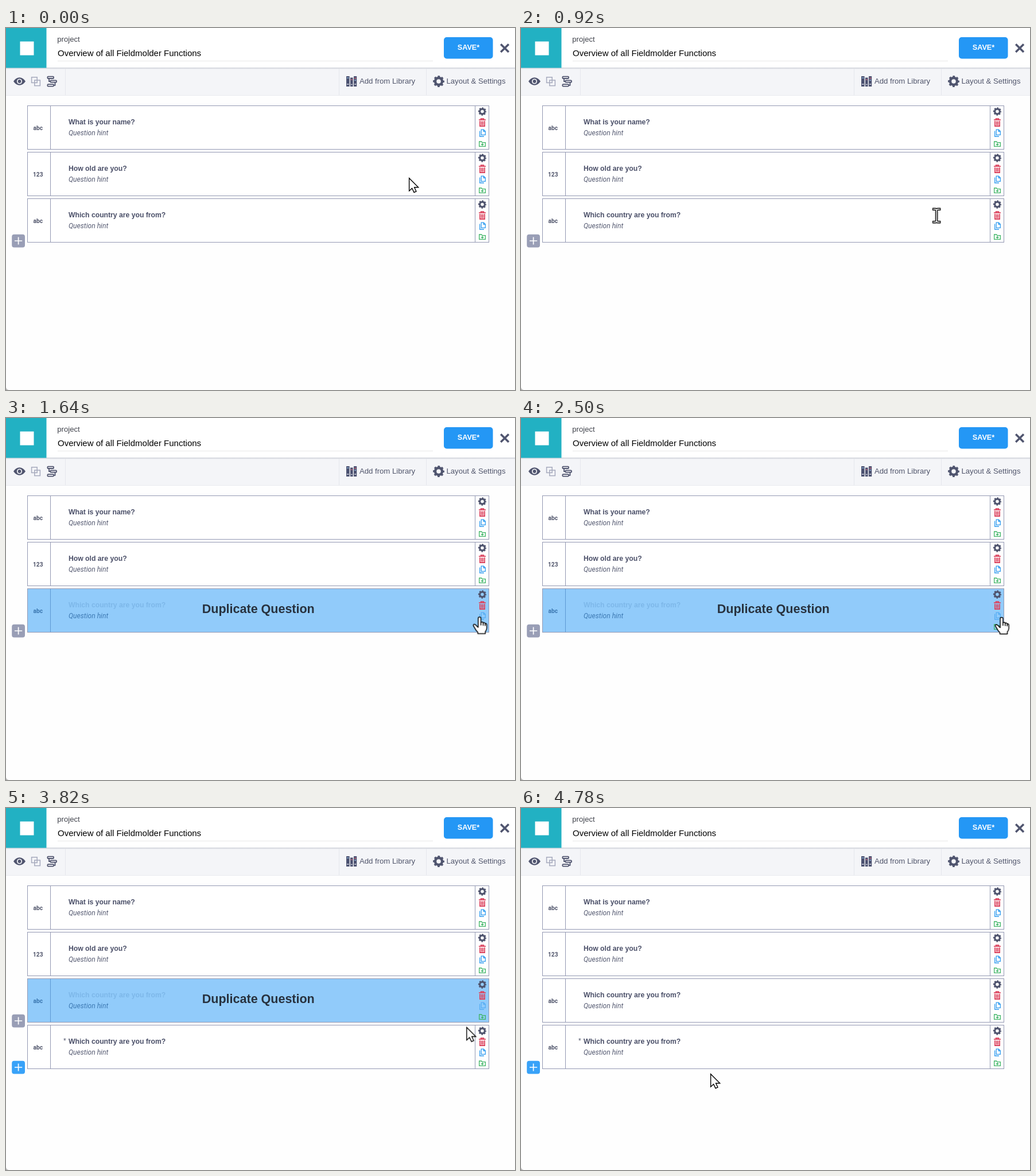
An HTML page that plays this animation: 887x631 px, repeating every 6.5 s.

```html
<!DOCTYPE html>
<html lang="en">
<head>
<meta charset="utf-8">
<title>Form editor: duplicate a question</title>
<style>
  html, body { margin: 0; width: 100%; height: 100%; overflow: hidden; background: #fefefe; }
  svg { display: block; width: 100%; height: 100%; }
  text { font-family: "Liberation Sans", Arial, sans-serif; fill: #51566c; }
  .label { font-weight: bold; font-size: 12.2px; fill: #4a4f68; }
  .hint { font: italic 12.1px Roboto, sans-serif; fill: #565b72; }
  .type { font: bold 10.2px Roboto, sans-serif; fill: #51566c; text-anchor: middle; }
  .menu { font-size: 13.15px; }
  .line { fill: none; stroke: #9499b3; }

  .hover, .dim, .grey, .copy, .arrow, .beam, .hand { animation: 6.5s step-end infinite; }
  .hover { animation-name: hover; }
  .dim { animation-name: dim; }
  .grey { animation-name: grey; }
  .copy { animation-name: copy; }
  .arrow { animation-name: arrow; }
  .beam { animation-name: beam; }
  .hand { animation-name: hand; }
  .cursor { animation: move 6.5s linear infinite; }

  @keyframes hover { 0% { opacity: 0 } 24% { opacity: 1 } 59.5% { opacity: 0 } }
  @keyframes dim { 0% { opacity: 1 } 24% { opacity: .23 } 59.5% { opacity: 1 } }
  @keyframes grey { 0% { opacity: 1 } 60% { opacity: 0 } }
  @keyframes copy { 0% { opacity: 0 } 48.31% { opacity: 1 } }
  @keyframes arrow { 0% { opacity: 1 } 12.6% { opacity: 0 } 57.4% { opacity: 1 } }
  @keyframes beam { 0% { opacity: 0 } 12.6% { opacity: 1 } 22.5% { opacity: 0 } }
  @keyframes hand { 0% { opacity: 0 } 22.5% { opacity: 1 } 57.4% { opacity: 0 } }
  @keyframes move {
    0%, 7.23% { transform: translate(702px, 261px) }
    9.23% { transform: translate(704px, 272px) }
    11.08% { transform: translate(709px, 294px) }
    12.92% { transform: translate(717px, 318px) }
    14.23% { transform: translate(724.5px, 327.5px) }
    15.38% { transform: translate(738px, 328.5px) }
    16.62% { transform: translate(760px, 328px) }
    17.54% { transform: translate(775px, 328px) }
    20% { transform: translate(794px, 331px) }
    22.31% { transform: translate(810px, 338px) }
    24% { transform: translate(820px, 344px) }
    25.31% { transform: translate(825.5px, 346.5px) }
    27.38%, 31.69% { transform: translate(834px, 346px) }
    33.38%, 38.46% { transform: translate(837.5px, 347px) }
    40%, 56.77% { transform: translate(834px, 346px) }
    57.69% { transform: translate(822px, 358px) }
    58.85% { transform: translate(801px, 383px) }
    60.77% { transform: translate(738px, 428px) }
    62.77% { transform: translate(642px, 476px) }
    64.85% { transform: translate(546px, 500px) }
    65.69% { transform: translate(504px, 503px) }
    66.92% { transform: translate(440px, 491px) }
    69.23% { transform: translate(385px, 477px) }
    71.38% { transform: translate(348px, 467px) }
    73.54%, 100% { transform: translate(330px, 463px) }
  }
</style>
</head>
<body>
<svg viewBox="0 0 887 631">
  <defs>
    <linearGradient id="shade" x2="0" y2="1">
      <stop offset="0" stop-color="#c9ccd4"/>
      <stop offset="1" stop-color="#f4f5f8"/>
    </linearGradient>
    <g id="gear" fill="none" stroke="#50556f">
      <circle r="6" stroke-width="4.4"/>
      <circle r="8.3" stroke-width="3.2" stroke-dasharray="3.5 3.02" stroke-dashoffset="1.75"/>
    </g>
    <g id="frame" class="line">
      <rect x="37.5" y="135.5" width="804" height="76" fill="#fff"/>
      <path d="M77.5 136V211M817.5 136V211"/>
    </g>
    <g id="sheets" fill="none" stroke="#2f9bf0" stroke-width="1.3">
      <path d="M828.2 177.2H832.4L835.3 180V186.3H828.2ZM832.2 177.5V180.3H835"/>
      <path d="M825.6 179.5V189H833"/>
    </g>
    <g id="tools">
      <use href="#gear" transform="translate(830 145.5) scale(.72)"/>
      <g fill="none" stroke="#dc4560" stroke-width="1.8">
        <path d="M824 160.2H836M827.6 159.6V158.2H832.4V159.6"/>
        <path d="M825.9 162V171H834.1V162M828.7 162.5V169.5M831.3 162.5V169.5"/>
      </g>
      <use href="#sheets"/>
      <path d="M824.7 198H828.6L830 199.6H835.4V206.4H824.7ZM830.2 200.8V205.2M828 203H832.4" fill="none" stroke="#3fb565" stroke-width="1.3"/>
    </g>
    <g id="plus">
      <rect x="10.2" y="359.8" width="22.8" height="22.6" rx="4"/>
      <path d="M15 371H28.2M21.6 364.4V377.6" stroke="#fff" stroke-width="1.7"/>
    </g>
  </defs>

  <rect width="887" height="631" fill="#fefefe"/>
  <path d="M0 626Q.5 630.5 5 631H0Z" fill="#b5b5b5"/>

  <!-- header -->
  <rect width="887" height="69" fill="#fff"/>
  <rect y="69" width="887" height="48" fill="#f4f5f8"/>
  <rect y="69" width="887" height="3" fill="url(#shade)"/>
  <path d="M0 117.5H887" stroke="#e9ebef"/>
  <rect width="70.5" height="69.5" fill="#22b1c3"/>
  <rect x="24.5" y="23.5" width="24" height="24" fill="#fff"/>
  <text x="89.3" y="24" font-size="13.1" style="fill:#40434c">project</text>
  <text x="90" y="49" font-size="15" style="fill:#000">Overview of all Fieldmolder Functions</text>
  <path d="M90 57.5H744" stroke="#e8e8e8"/>
  <rect x="763" y="16" width="85.5" height="37.5" rx="5" fill="#2497f5"/>
  <text x="806" y="38.3" font-size="12.7" font-weight="bold" text-anchor="middle" style="fill:#fff">SAVE*</text>
  <path d="M862.2 28.2L876 42M876 28.2L862.2 42" stroke="#50556f" stroke-width="3.5"/>

  <!-- toolbar -->
  <path d="M103.5 71V117M580.5 71V117M732.5 71V117" stroke="#e5e7ed"/>
  <path d="M13 93Q17.5 86.3 23.5 86.3T34 93Q29.5 99.7 23.5 99.7T13 93Z" fill="#50556f"/>
  <circle cx="23.5" cy="93" r="4.6" fill="#f4f5f8"/>
  <circle cx="23.5" cy="93" r="2.9" fill="#50556f"/>
  <g fill="none" stroke="#a6aabd" stroke-width="1.5">
    <rect x="44.6" y="85.8" width="9.6" height="9.6"/>
    <rect x="49.8" y="91" width="9.6" height="9.6"/>
  </g>
  <g fill="none" stroke="#50556f" stroke-width="1.8">
    <rect x="72.4" y="84.6" width="10.6" height="3.4" rx="1"/>
    <rect x="77.4" y="91.3" width="10.6" height="3.4" rx="1"/>
    <rect x="72.4" y="98.2" width="10.6" height="3.4" rx="1"/>
    <path d="M75 88V93H77M85.5 94.7V99.9H83"/>
  </g>
  <g fill="#4b5170">
    <path d="M593 84H598.6V102H593ZM600 86.5H604.6V102H600ZM606 84H611.2V102H606Z"/>
    <path d="M594.2 87H597.4M607.2 91H610" stroke="#8fb9dc" stroke-width="1.4"/>
    <path d="M601.2 90H603.4M607.2 87.5H610" stroke="#df6a7d" stroke-width="1.6"/>
    <path d="M594.2 98H597.4M601.2 98.5H603.4M607.2 98H610" stroke="#dfe3ec" stroke-width="1.4"/>
  </g>
  <text class="menu" x="616" y="97">Add from Library</text>
  <use href="#gear" x="754" y="93"/>
  <text class="menu" x="767.5" y="97">Layout &amp; Settings</text>

  <!-- questions -->
  <g>
    <use href="#frame"/>
    <text class="type" x="55.8" y="177.8">abc</text>
    <text class="label" x="109" y="168">What is your name?</text>
    <text class="hint" x="109" y="187">Question hint</text>
    <use href="#tools"/>
  </g>
  <g transform="translate(0 81)">
    <use href="#frame"/>
    <text class="type" x="55.8" y="177.8">123</text>
    <text class="label" x="109" y="168">How old are you?</text>
    <text class="hint" x="109" y="187">Question hint</text>
    <use href="#tools"/>
  </g>
  <g transform="translate(0 162)">
    <use href="#frame"/>
    <text class="type" x="55.8" y="177.8">abc</text>
    <text class="label dim" x="109" y="168">Which country are you from?</text>
    <text class="hint" x="109" y="187">Question hint</text>
    <g class="hover">
      <rect x="38" y="136" width="803" height="75" fill="#2497f5" opacity=".5"/>
      <rect x="816" y="136" width="25" height="75" fill="#92cbfa"/>
      <text x="439.8" y="178" font-size="21.5" font-weight="bold" text-anchor="middle" style="fill:#28323f">Duplicate Question</text>
    </g>
    <use href="#tools"/>
    <g class="hover"><rect x="824" y="176" width="12.5" height="14" fill="#92cbfa" opacity=".4"/></g>
  </g>
  <g class="grey"><use href="#plus" fill="#999eb6"/></g>
  <g class="copy">
    <g transform="translate(0 243)">
      <use href="#frame"/>
      <text class="type" x="55.8" y="177.8">abc</text>
      <text x="100" y="167" font-size="12">*</text>
      <text class="label" x="109" y="168">Which country are you from?</text>
      <text class="hint" x="109" y="187">Question hint</text>
      <use href="#tools"/>
    </g>
    <use href="#plus" y="81" fill="#38a2f8"/>
  </g>

  <!-- pointer -->
  <g class="cursor">
    <path class="arrow" d="M.6 .8V23L5.6 18.4L9 25.5L12.9 23.8L9.6 16.8H16.6Z" fill="#fff" stroke="#000" stroke-width="1.4"/>
    <g class="beam" fill="none">
      <path id="bar" d="M-7.2 -11.3H-2.4Q0 -11.3 0 -9V9Q0 11.3 -2.4 11.3H-7.2M7.2 -11.3H2.4Q0 -11.3 0 -9M0 9Q0 11.3 2.4 11.3H7.2" stroke="#000" stroke-width="4.6"/>
      <path d="M-6 -11.3H-2.4Q0 -11.3 0 -9V9Q0 11.3 -2.4 11.3H-6M6 -11.3H2.4Q0 -11.3 0 -9M0 9Q0 11.3 2.4 11.3H6" stroke="#fff" stroke-width="1.6"/>
    </g>
    <g class="hand" stroke="#000" stroke-width="1.5" stroke-linejoin="round" stroke-linecap="round">
      <path d="M-2.4 2.8Q-2.4 .6 0 .6T2.4 2.8V9.8Q6 8.2 6.4 10.8Q9.4 9.4 9.8 12Q12.6 11.2 12.6 14V20Q12.4 23 10 26V29.6H-3V27Q-6.4 24 -8.4 19.6L-10.6 16Q-11.4 13.4 -9.2 13.2Q-7 13 -4.6 16.6L-2.4 18.4Z" fill="#fff"/>
      <path d="M2.4 9.8V14.5M6.4 10.8V15M9.8 12V15.6" fill="none"/>
    </g>
  </g>
</svg>
</body>
</html>
```
